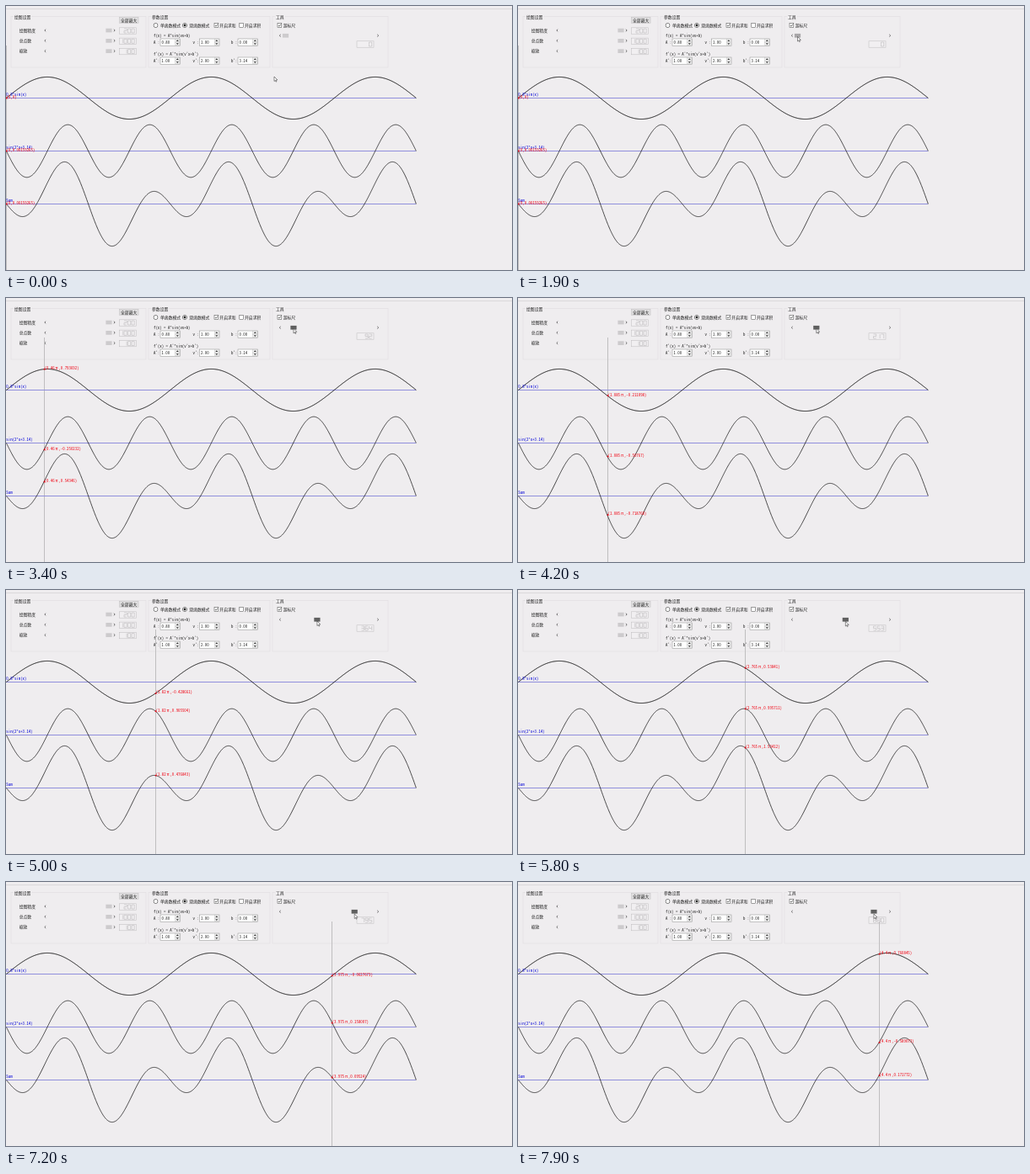
An HTML page with a canvas that plays this animation: 600x314 px, repeating every 8000 ms.

```html
<!DOCTYPE html>
<html lang="zh">
<head>
<meta charset="utf-8">
<title>Sine plotter</title>
<style>
  html, body { margin: 0; width: 100%; height: 100%; overflow: hidden; background: #efedef; }
  canvas { display: block; width: 600px; height: 314px; }
</style>
</head>
<body>
<canvas id="stage"></canvas>
<script>
const W = 600, H = 314, LOOP = 8000, STEP = 100;
const PI_PX = 97.2, UNIT = 31.3, PLOT_END = 486;
const CELL = 2.42;
const CJK = '4.84px "Noto Sans CJK SC", "Noto Sans CJK", sans-serif';

const canvas = document.getElementById('stage');
const ctx = canvas.getContext('2d');
const dpr = window.devicePixelRatio || 1;
canvas.width = W * dpr;
canvas.height = H * dpr;

// Pick the font size whose character advance is one cell
const MONO_FAMILY = '"Noto Sans Mono CJK SC", "DejaVu Sans Mono", monospace';
ctx.font = '100px ' + MONO_FAMILY;
const MONO = 100 * CELL / ctx.measureText('0').width + 'px ' + MONO_FAMILY;

const first = x => 0.8 * Math.sin(x);
const second = x => Math.sin(2 * x + 3.14);
const waves = [
  { name: '0.8*sin(x)', axis: 109.5, width: 1, fn: first },
  { name: 'sin(2*x+3.14)', axis: 172.5, width: 0.75, fn: second },
  { name: 'Sum', axis: 235.5, width: 0.75, fn: x => first(x) + second(x) }
];

// [time, ruler position in multiples of pi]
const rulerKeys = [[2500, 0], [3400, 0.46], [4200, 1.085], [5000, 1.82], [5200, 2.13],
  [6100, 3.08], [6600, 3.62], [7000, 3.82], [7400, 4.13], [7500, 4.13], [7900, 4.4]];
// [time, x, y] of the pointer, before the ruler offset
const pointerKeys = [[100, 318, 84], [400, 321.5, 86], [700, 321.5, 86], [1600, 332, 40],
  [1900, 331.5, 36.5], [4200, 331.5, 36.3], [5000, 331.5, 37], [6600, 331.5, 38]];

function track(keys, t, col = 1) {
  if (t <= keys[0][0]) return keys[0][col];
  for (let i = 1; i < keys.length; i++) {
    const a = keys[i - 1], b = keys[i];
    if (t <= b[0]) return a[col] + (b[col] - a[col]) * (t - a[0]) / (b[0] - a[0]);
  }
  return keys[keys.length - 1][col];
}

function line(x1, y1, x2, y2, color, width = 1) {
  ctx.strokeStyle = color;
  ctx.lineWidth = width;
  ctx.beginPath();
  ctx.moveTo(x1, y1);
  ctx.lineTo(x2, y2);
  ctx.stroke();
}

function box(x, y, w, h, fill, border, width = 0.5) {
  if (fill) {
    ctx.fillStyle = fill;
    ctx.fillRect(x, y, w, h);
  }
  if (border) {
    ctx.strokeStyle = border;
    ctx.lineWidth = width;
    ctx.strokeRect(x, y, w, h);
  }
}

function text(str, x, y, color = '#222', font = MONO) {
  ctx.font = font;
  ctx.fillStyle = color;
  ctx.fillText(str, x, y);
}

const label = (str, x, midY) => text(str, x, midY + 1.8, '#222', CJK);

function dot(x, y, r, color) {
  ctx.fillStyle = color;
  ctx.beginPath();
  ctx.arc(x, y, r, 0, 2 * Math.PI);
  ctx.fill();
}

function poly(points, fill, border, width = 0.5) {
  ctx.beginPath();
  points.forEach(([x, y]) => ctx.lineTo(x, y));
  ctx.closePath();
  ctx.fillStyle = fill;
  ctx.fill();
  if (border) {
    ctx.strokeStyle = border;
    ctx.lineWidth = width;
    ctx.stroke();
  }
}

function group(title, x, right) {
  box(x, 12.5, right - x, 60.5, null, '#dfdddf', 0.6);
  ctx.fillStyle = '#efedef';
  ctx.fillRect(x + 3, 10, title.length * 4.84 + 2, 5);
  label(title, x + 4, 13.2);
}

function radio(x, y, on) {
  dot(x, y, 2.7, '#444');
  dot(x, y, 2.2, '#fff');
  if (on) dot(x, y, 1.4, '#222');
}

function check(x, y, on) {
  box(x, y - 2.4, 4.8, 4.8, '#fff', '#444');
  if (!on) return;
  ctx.strokeStyle = '#222';
  ctx.lineWidth = 0.6;
  ctx.beginPath();
  ctx.moveTo(x + 0.9, y);
  ctx.lineTo(x + 2, y + 1.2);
  ctx.lineTo(x + 4, y - 1.3);
  ctx.stroke();
}

function chevron(x, y, dir) {
  ctx.strokeStyle = '#333';
  ctx.lineWidth = 0.7;
  ctx.beginPath();
  ctx.moveTo(x - dir * 0.7, y - 1.3);
  ctx.lineTo(x + dir * 0.7, y);
  ctx.lineTo(x - dir * 0.7, y + 1.3);
  ctx.stroke();
}

function slider(left, right, y, handleX, color) {
  chevron(left, y, -1);
  chevron(right, y, 1);
  box(handleX - 3.6, y - 2.3, 7.2, 4.7, color);
}

// Seven segments per digit: top, upper right, lower right, bottom, lower left, upper left, middle
const SEGMENTS = ['1111110', '0110000', '1101101', '1111001', '0110011',
  '1011011', '1011111', '1110000', '1111111', '1111011'];

function lcd(value, x, y) {
  box(x, y, 20, 7.4, '#f1eff1', '#bdbbbd');
  const digits = String(value);
  [...digits].forEach((d, i) => {
    const l = x + 19 - (digits.length - i) * 4.5, r = l + 3.2;
    const t = y + 1.2, m = y + 3.7, b = y + 6.2;
    const segs = [[l, t, r, t], [r, t, r, m], [r, m, r, b], [l, b, r, b],
      [l, m, l, b], [l, t, l, m], [l, m, r, m]];
    segs.forEach((s, k) => SEGMENTS[d][k] === '1' && line(...s, '#bcbabc', 0.6));
  });
}

function spin(name, value, x, boxX, y) {
  text(name, x, y + 1.7);
  box(boxX, y - 4, 23.5, 8.2, '#fff', '#8a8a8a');
  text(value, boxX + 1.5, y + 1.7);
  const ax = boxX + 20.3;
  box(ax - 2.6, y - 3.5, 5.2, 3.5, '#f1f1f1', '#bbb', 0.4);
  box(ax - 2.6, y + 0.2, 5.2, 3.5, '#f1f1f1', '#bbb', 0.4);
  poly([[ax - 1.5, y - 1], [ax + 1.5, y - 1], [ax, y - 2.7]], '#333');
  poly([[ax - 1.5, y + 1.2], [ax + 1.5, y + 1.2], [ax, y + 2.9]], '#333');
}

function drawSettings() {
  group('绘图设置', 6, 166);
  box(134.5, 13.2, 22.5, 7, '#e0dfe0', '#bdbbbd');
  label('全部最大', 136, 16.8);
  [['绘图精度', 200], ['总点数', 1000], ['缩放', 100]].forEach(([name, value], i) => {
    const y = 29 + i * 12.3;
    label(name, 15.7, y);
    slider(46.5, 128.5, y, 122, '#cdcbcd');
    lcd(value, 134.5, y - 3.2);
  });
}

function drawParameters() {
  group('参数设置', 169, 313);
  radio(177.5, 23, false);
  label('单函数模式', 183, 23);
  radio(212, 23, true);
  label('双函数模式', 217.3, 23);
  check(247, 23, true);
  label('开启求和', 253.3, 23);
  check(276.8, 23, false);
  label('开启求积', 283, 23);

  text('f(x) = A*sin(vx+b)', 175, 37);
  spin('A :', '0.80', 175, 183, 43);
  spin('v :', '1.00', 221.5, 229.5, 43);
  spin('b :', '0.00', 267, 275, 43);
  text("f'(x) = A'*sin(v'x+b')", 175, 59.2);
  spin("A':", '1.00', 175, 183, 65);
  spin("v':", '2.00', 221.5, 229.5, 65);
  spin("b':", '3.14', 267, 275, 65);
}

function drawTools(t, ruler) {
  group('工具', 316, 453);
  check(322, 23, true);
  label('游标尺', 328.7, 23);
  const color = t < 1700 ? '#cdcbcd' : t < 2500 ? '#a9a7a9' : '#606060';
  slider(325, 441, 35.2, 331.5 + 20.56 * ruler, color);
  lcd(Math.round(ruler * 200), 416, 41.8);
}

function drawWave({ name, axis, width, fn }) {
  line(0, axis, PLOT_END, axis, '#908fdc');
  ctx.strokeStyle = '#111';
  ctx.lineWidth = width;
  ctx.beginPath();
  for (let x = 0; x <= PLOT_END; x += 0.5) {
    ctx.lineTo(x + 0.4, axis - UNIT * fn(x / PI_PX * Math.PI));
  }
  ctx.stroke();
  text(name, 0.3, axis - 2.9, '#0000d8');
}

function drawReading({ axis, fn }, ruler, x) {
  const value = fn(ruler * Math.PI), y = axis - UNIT * value;
  const head = '(' + ruler, tail = ',' + Number(value.toPrecision(6)) + ')';
  const baseline = y + 0.4;
  dot(x, y, 0.9, '#e00010');
  text(head, x, baseline, '#f00010');
  let end = x + head.length * CELL;
  if (ruler) {
    text('π', end + 0.9, baseline, '#f00010', CJK);
    end += 2 * CELL;
  }
  text(tail, end, baseline, '#f00010');
}

function drawPointer(t, ruler) {
  const x = track(pointerKeys, t, 1) + 20.56 * ruler, y = track(pointerKeys, t, 2);
  const shape = [[0, 0], [0, 5.5], [1.3, 4.4], [2.1, 6.2], [2.9, 5.8], [2.1, 4], [3.9, 3.9]];
  poly(shape.map(([dx, dy]) => [x + dx, y + dy]), '#fff', '#222');
}

function draw(now) {
  const t = Math.floor(now % LOOP / STEP) * STEP;
  const ruler = Math.round(track(rulerKeys, t) * 200) / 200;
  const x = Math.floor(ruler * PI_PX + 0.6) + 0.5;

  ctx.setTransform(dpr, 0, 0, dpr, 0, 0);
  ctx.fillStyle = '#efedef';
  ctx.fillRect(0, 0, W, H);
  line(0, 3.5, W, 3.5, '#dad8da');

  drawSettings();
  drawParameters();
  drawTools(t, ruler);
  line(x, 47, x, H, '#bfbebf');
  waves.forEach(drawWave);
  waves.forEach(w => drawReading(w, ruler, x));
  drawPointer(t, ruler);
}

const start = performance.now();
function tick() {
  draw(performance.now() - start);
  requestAnimationFrame(tick);
}
tick();
</script>
</body>
</html>
```
